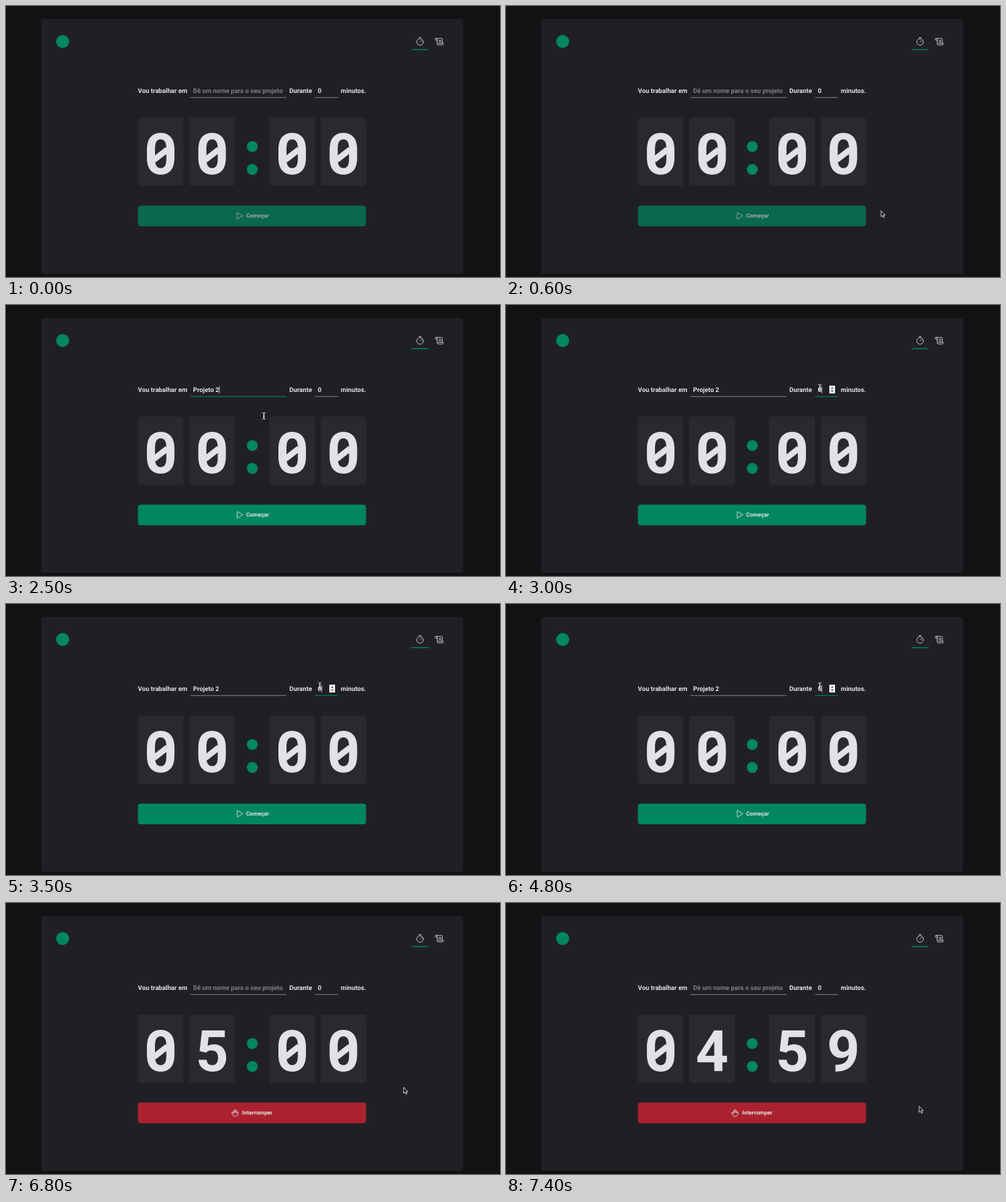
Recreate the animation shown at these times as an HTML page. Size 680 by 374 pixels, loop 8 s.

```html
<!DOCTYPE html>
<html lang="pt-BR">
<head>
<meta charset="utf-8">
<title>Timer</title>
<style>
  html, body { margin: 0; width: 100%; height: 100%; overflow: hidden; background: #121214; }
  svg { display: block; width: 680px; height: 374px; }
  text { font: bold 8.83px Roboto, sans-serif; fill: #e1e1e6; text-rendering: geometricPrecision; white-space: pre; }
  .digit { font-size: 79px; text-anchor: middle; }
  .label { font-size: 7.85px; }
  .icon { fill: none; stroke: #e1e1e6; stroke-width: .8; stroke-linecap: round; stroke-linejoin: round; }
  .green { fill: #00875f; }
</style>
</head>
<body>
<svg viewBox="0 0 680 374">
  <rect x="48.3" y="18" width="580.9" height="351.6" rx="3.9" fill="#202024"/>

  <circle cx="78" cy="49" r="9" class="green"/>
  <g class="icon">
    <circle cx="570" cy="49.6" r="4.5"/>
    <path d="M570 49.6l2.1-2.1M568.6 43.6h2.8"/>
    <path d="M593.6 52V46.2a1.4 1.4 0 1 0-1.4 1.1h1.4M592.3 44.8h7a1.4 1.4 0 0 1 1.4 1.4v5.2M595.5 51.5h6.2a1.4 1.4 0 0 1-1.2 2.3h-5.2a1.6 1.6 0 0 1-1.7-1.8M596 47.6h2.8M596 49.4h2.8"/>
  </g>
  <rect x="558" y="59.6" width="23.6" height="1.3" class="green"/>

  <text x="181.6" y="120">Vou trabalhar em</text>
  <text x="257.5" y="120" id="task"></text>
  <rect x="253.7" y="125.8" width="132.3" height="1" id="taskLine"/>
  <text x="390" y="120">Durante</text>
  <text x="429.3" y="120" id="minutes"></text>
  <rect x="425.4" y="125.8" width="31.5" height="1" id="minutesLine"/>
  <text x="460.8" y="120">minutos.</text>
  <g id="spinner">
    <rect x="445" y="111.3" width="8" height="10.8" fill="#efefef"/>
    <path d="M447.2 115.6l1.8-2.2 1.8 2.2zM447.2 117.9l1.8 2.2 1.8-2.2z" fill="#404044"/>
  </g>
  <rect id="caret" y="112" width=".8" height="9.8" fill="#e1e1e6"/>

  <g id="clock"></g>
  <g class="green">
    <circle cx="339" cy="193.9" r="7.5"/>
    <circle cx="339" cy="225.6" r="7.5"/>
  </g>

  <g id="start">
    <rect x="181.6" y="275.6" width="314" height="28.3" rx="3.9" class="green"/>
    <path class="icon" d="M318.2 285.3v8.8l7.6-4.4z"/>
    <text x="330.4" y="292.3" class="label">Começar</text>
  </g>
  <g id="stop">
    <rect x="181.6" y="275.6" width="314" height="28.3" rx="3.9" fill="#ab222e"/>
    <path class="icon" d="M312.8 290.6v-3.2q.8-1.4 1.6 0v-1.7q.8-1.4 1.6 0v1.3q.8-1.4 1.6 0v2.8q.4-1.6 1.8-1.1v2.4a4.2 4.2 0 0 1-8 .7l-.8-2.2q.3-1.4 1.5-.2zM314.4 287.4v2M316 287v2.3"/>
    <text x="325" y="292.3" class="label">Interromper</text>
  </g>

  <path id="beam" fill="none" stroke="#d4d4d8" stroke-width="1" d="M-2.3-4.5q2.3 0 2.3 1.2v6.6q0 1.2-2.3 1.2M2.3-4.5q-2.3 0-2.3 1.2v6.6q0 1.2 2.3 1.2M-1 1.7h2"/>
  <path id="arrow" fill="#101012" stroke="#f0f0f2" stroke-width=".8" stroke-linejoin="round" d="M0 0v8.2l1.9-1.7 1.3 3 1.4-.6-1.3-2.9h2.5z"/>
</svg>
<script>
const LOOP = 8000, STEP = 100;
const CARD_X = [181.6, 252.3, 362.5, 433.1];
const $ = id => document.getElementById(id);
const show = (id, visible) => $(id).setAttribute('visibility', visible ? 'visible' : 'hidden');
const within = (t, from, to) => t >= from && t < to;

// Pointer path: time, x, y; straight eased travel between points.
const POINTER = [
  [100, 640, 380], [1300, 311, 121], [1600, 311, 121], [1700, 355, 153],
  [2500, 355, 153], [3000, 432, 114], [3300, 432, 113], [6500, 432, 113], [6900, 568.7, 280.5]
];

$('clock').innerHTML = CARD_X.map(x => `
  <rect x="${x}" y="154" width="62.8" height="94.2" rx="3.9" fill="#29292e"/>
  <text class="digit" x="${x + 31.4}" y="232.3"></text>
  <path d="M${x + 22} 212.5l18.6-14.5" stroke="#e1e1e6" stroke-width="8"/>`).join('');
const digits = [...document.querySelectorAll('.digit')];

function pointerAt(t) {
  const next = POINTER.findIndex(point => point[0] > t);
  if (next < 0) return POINTER.at(-1).slice(1);
  if (next === 0) return POINTER[0].slice(1);
  const [t0, x0, y0] = POINTER[next - 1], [t1, x1, y1] = POINTER[next];
  const p = (t - t0) / (t1 - t0), eased = p * p * (3 - 2 * p);
  return [x0 + (x1 - x0) * eased, y0 + (y1 - y0) * eased];
}

function setClock(value) {
  digits.forEach((digit, i) => {
    digit.textContent = value[i];
    digit.nextElementSibling.setAttribute('visibility', value[i] === '0' ? 'visible' : 'hidden');
  });
}

function render(t) {
  const filled = within(t, 2500, 6100), running = t >= 6100;
  const taskFocus = within(t, 1400, 2900), minutesFocus = within(t, 2900, 6100);
  const lineColor = focused => focused ? '#00875f' : '#7c7c8a';

  $('task').textContent = filled ? 'Projeto 2' : 'Dê um nome para o seu projeto';
  $('task').style.fill = filled ? '#e1e1e6' : '#7c7c8a';
  $('minutes').textContent = within(t, 4800, 6100) ? '5' : '0';
  $('taskLine').setAttribute('fill', lineColor(taskFocus));
  $('minutesLine').setAttribute('fill', lineColor(minutesFocus));
  show('spinner', minutesFocus);
  show('caret', minutesFocus || taskFocus && !within(t, 2000, 2500));
  $('caret').setAttribute('x', minutesFocus ? 434.4 : filled ? 293.4 : 257.4);

  setClock(!running ? '0000' : t < 7200 ? '0500' : '0459');
  show('start', !running);
  show('stop', running);
  $('start').setAttribute('opacity', filled ? 1 : .7);

  const [x, y] = pointerAt(t);
  const beam = within(t, 1200, 2600) || within(t, 2900, 5400);
  show('beam', beam);
  show('arrow', !beam && t >= 200 && !within(t, 5400, 6600));
  for (const id of ['beam', 'arrow']) $(id).setAttribute('transform', `translate(${x} ${y})`);
}

const begin = performance.now();
function frame() {
  const t = (performance.now() - begin) % LOOP;
  render(Math.floor(t / STEP) * STEP);
  requestAnimationFrame(frame);
}
frame();
</script>
</body>
</html>
```
